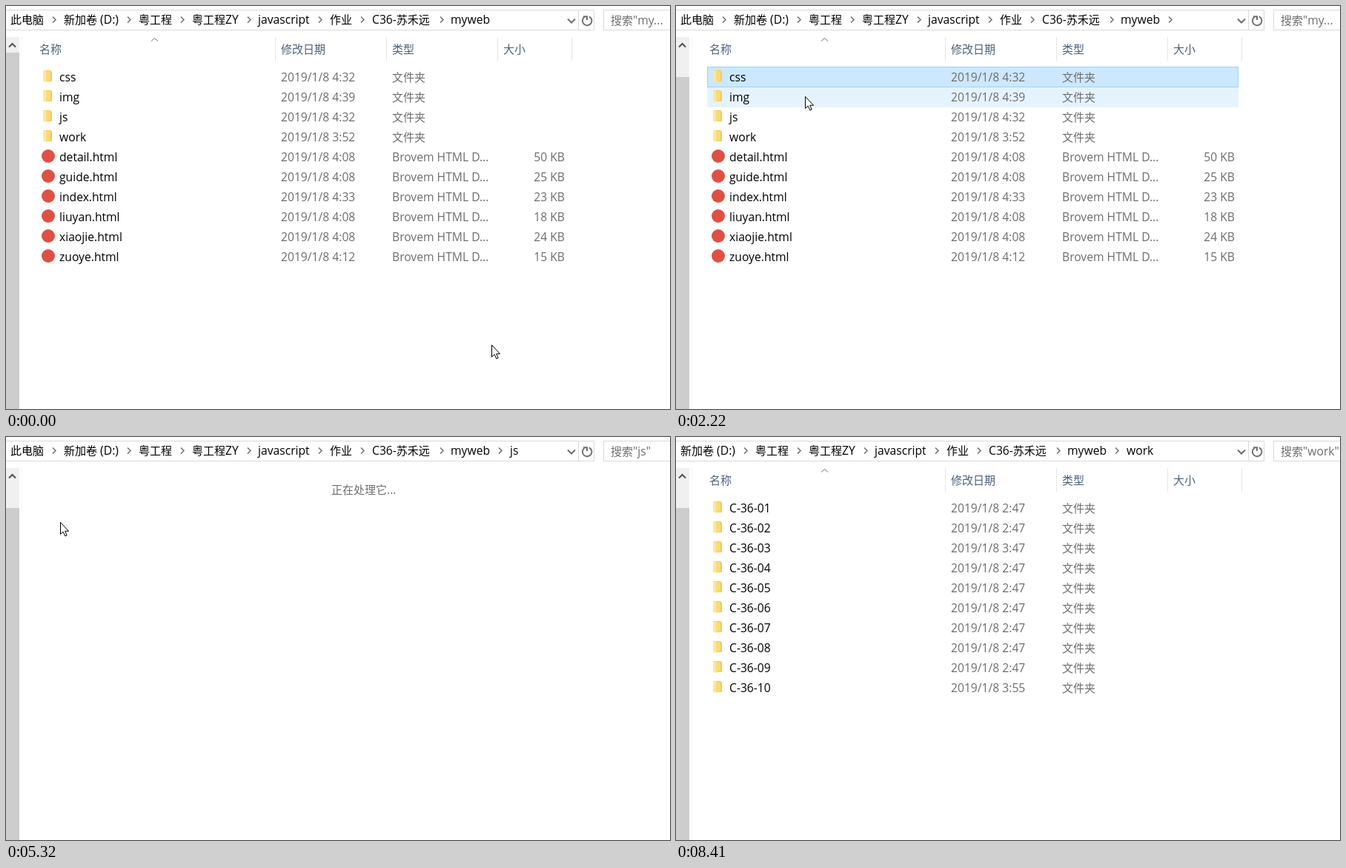
An HTML page that plays this animation: 896x545 px, repeating every 8490 ms.

```html
<!DOCTYPE html>
<html lang="zh-CN">
<head>
<meta charset="utf-8">
<title>myweb</title>
<style>
  html, body { margin: 0; width: 100%; height: 100%; overflow: hidden; background: #fff; }
  svg { display: block; width: 896px; height: 545px; }
  text { font: 15.66px "Open Sans", "Noto Sans CJK SC", "Noto Sans CJK", sans-serif; fill: #6d6d6d; }
  .han { font-family: "Noto Sans CJK SC", "Noto Sans CJK", sans-serif; font-size: 15px; }
  .dark { fill: #000; }
  .head { fill: #4c607a; }
  .tip { fill: #575757; }
  .line { fill: none; stroke: #d9d9d9; }
  .rule { fill: none; stroke: #e5e5e5; }
  .glyph { fill: none; stroke: #6e6e6e; stroke-width: 1.5; }
  .bold { stroke-width: 2; }
</style>
</head>
<body>
<svg viewBox="0 0 896 545">
  <defs>
    <g id="folder">
      <path d="M1 0H10L12 2V15H1Z" fill="#f4c95f"/>
      <path d="M0 1L4 0V13L6 14V16L0 15Z" fill="#ffe69c"/>
      <path d="M4 1H10V14H4Z" fill="#fad978"/>
    </g>
    <circle id="page" cx="7" cy="8" r="9" fill="#dd5144"/>
    <path id="file" d="M.5 .5H9L12.5 4V16.5H.5ZM9 .5V4H12.5" fill="#fff" stroke="#909090"/>
  </defs>
  <rect width="896" height="545" fill="#fff"/>
  <path class="line" d="M-1 5.5H793.5V32.5H-1M772.5 5.5V32.5M900 5.5H806.5V32.5H900"/>
  <path class="glyph bold" d="M758 17.5L763 22.5L768 17.5"/>
  <path class="glyph bold" d="M787 14.3A6.3 6.3 0 1 1 780.5 14.8M779 14.3H784V19"/>
  <path d="M0 42H18V545H0Z" fill="#f0f0f0"/>
  <path d="M21.5 42V545" stroke="#f8f8f8"/>
  <rect id="thumb" width="18" height="500" fill="#cdcdcd"/>
  <path d="M4 55.5L8.5 51L13 55.5" fill="none" stroke="#505050" stroke-width="2"/>
  <rect id="hover" x="42" width="717" height="27" fill="#e5f3ff"/>
  <g id="scene"></g>
  <path id="cursor" d="M.5 .5V16.5L4.2 13.2L6.8 19L9.2 18L6.7 12.3H11.5Z" fill="#fff" stroke="#000"/>
</svg>
<script>
const LOOP = 8490, ROW = 27, TOP = 82;
const $ = id => document.getElementById(id);

const text = (x, y, str, cls = "", extra = "") =>
  `<text x="${x}" y="${y}" class="${cls}" ${extra}>` +
  str.replace(/[\u3400-\u9fff]+/g, run => `<tspan class="han">${run}</tspan>`) + "</text>";
const chevron = x => `<path class="glyph" d="M${x} 14.5L${x + 4} 18.5L${x} 22.5"/>`;

const two = n => String(n).padStart(2, "0");
const folder = (name, time) => ({ icon: "folder", name, time, type: "文件夹" });
const page = (name, time, size) =>
  ({ icon: "page", name: name + ".html", time, type: "Brovem HTML D...", size: size + " KB" });
const file = (name, type, size, time = "3:30") => ({ icon: "file", name, time, type, size: size + " KB" });

const views = {
  myweb: [
    folder("css", "4:32"), folder("img", "4:39"), folder("js", "4:32"), folder("work", "3:52"),
    page("detail", "4:08", 50), page("guide", "4:08", 25), page("index", "4:33", 23),
    page("liuyan", "4:08", 18), page("xiaojie", "4:08", 24), page("zuoye", "4:12", 15)
  ],
  css: ["detail", "global", "guide", "index", "liuyan"].map((n, i) => file(n + ".css", "CSS 文件", 4 + i)),
  img: Array.from({ length: 17 }, (_, i) => file(two(i + 1) + ".jpg", "JPG 文件", 20 + i * 7 % 60)),
  js: [["global.js", 2], ["jquery.toast.js", 16], ["jquery-2.2.4.min.js", 84]]
    .map(([n, size]) => file(n, "JS 文件", size)),
  work: Array.from({ length: 10 }, (_, i) =>
    folder("C-36-" + two(i + 1), { 2: "3:47", 9: "3:55" }[i] || "2:47"))
};

const crumbs = [["此电脑", 6, 51], ["新加卷 (D:)", 78, 152], ["粤工程", 179, 224], ["粤工程ZY", 251, 314],
  ["javascript", 340, 410], ["作业", 437, 467], ["C36-苏禾远", 494, 574], ["myweb", 600, 653]];
const leafWidth = { css: 22, img: 28, js: 12, work: 37 };

const tips = {
  img: { x: 170, y: 156, w: 250, lines: ["创建日期: 2019/1/3 3:30", "大小: 1.02 MB", "文件: 01.jpg, 02.jpg, 03.jpg, ..."] },
  js: { x: 88, y: 163, w: 363, lines: ["创建日期: 2019/1/3 3:30", "大小: 102 KB",
    "文件: global.js, jquery.toast.js, jquery-2.2.4.min.js"] }
};

// Each entry changes some properties of the window from its time on.
const states = [
  [0, { view: "myweb", sel: -1, more: false, loading: false, tip: "", thumb: 63 }],
  [670, { sel: 0 }],
  [830, { view: "css", loading: true }],
  [980, { loading: false, thumb: 96 }],
  [1830, { view: "myweb" }],
  [1990, { more: true }],
  [2610, { tip: "img" }],
  [2760, { tip: "", sel: 1 }],
  [2930, { view: "img", loading: true, more: false }],
  [3090, { loading: false }],
  [4090, { view: "myweb" }],
  [4480, { more: true }],
  [4980, { sel: 2 }],
  [5240, { view: "js", loading: true, more: false }],
  [5400, { loading: false }],
  [6330, { view: "myweb" }],
  [6480, { more: true }],
  [6640, { tip: "js" }],
  [7100, { tip: "" }],
  [7250, { sel: 3 }],
  [7330, { view: "work", loading: true }],
  [7480, { loading: false }],
  [8410, { more: false }]
];

// Pointer stops: time, x, y
const path = [
  [0, 655, 458], [70, 655, 458], [350, 174, 104], [499, 174, 104], [500, 175, 104], [830, 175, 104],
  [1060, 24, 14], [1140, 24, -30], [1830, 24, -30], [1910, 24, 14], [2150, 174, 122], [2600, 174, 122],
  [2760, 172, 131], [3000, 172, 131], [3300, 2, 45], [3939, 2, 45], [3940, 47, 37], [4089, 47, 37],
  [4090, 47, -30], [4240, 47, -30], [4340, 42, 87], [4450, 42, 87], [4700, 95, 183], [4900, 88, 150],
  [5240, 88, 150], [5560, 29, 12], [5630, 29, -30], [6330, 29, -30], [6400, 42, 12], [6560, 88, 150],
  [6640, 91, 157], [7080, 91, 157], [7180, 95, 172], [7480, 95, 172], [7690, 880, 520],
  [7720, 880, 560], [LOOP, 880, 560]
];

function pointerAt(t) {
  const i = Math.max(1, path.findIndex(p => p[0] > t));
  const [t0, x0, y0] = path[i - 1], [t1, x1, y1] = path[i];
  const k = (t - t0) / (t1 - t0);
  return [Math.round(x0 + (x1 - x0) * k), Math.round(y0 + (y1 - y0) * k)];
}

function addressBar({ view, more }) {
  const trail = view === "myweb" ? crumbs : [...crumbs, [view, 680, 680 + leafWidth[view]]];
  const shift = view === "img" || view === "work" ? 72 : 0;
  const shown = shift ? trail.slice(1) : trail;
  const items = shown.map(([name, x, end], i) =>
    text(x - shift, 24, name, "dark") +
    (i < shown.length - 1 || more ? chevron(end - shift + 12) : "")).join("");
  return items + text(816, 25, view === "myweb" ? '搜索"my...' : `搜索"${view}"`);
}

function fileRow(item, i) {
  const y = 102 + i * ROW;
  return `<use href="#${item.icon}" x="50" y="${y - 15}"/>` + text(72, y, item.name, "dark") +
    text(371, y, "2019/1/8 " + item.time) + text(521, y, item.type) +
    (item.size ? text(754, y, item.size, "", 'text-anchor="end"') : "");
}

function listing({ view, sel }) {
  const heads = [["名称", 45], ["修改日期", 371], ["类型", 521], ["大小", 671]];
  const mark = view === "myweb" && sel >= 0
    ? `<rect x="42.5" y="${TOP + sel * ROW + .5}" width="716" height="27" fill="#cce8ff" stroke="#99d1ff"/>` : "";
  return heads.map(([name, x]) => text(x, 64, name, "head")).join("") +
    '<path class="rule" d="M363.5 42V74M513.5 42V74M663.5 42V74M763.5 42V74"/>' +
    '<path d="M196 47.5L200.5 43.5L205 47.5" fill="none" stroke="#6e6e6e"/>' +
    mark + views[view].map(fileRow).join("");
}

function tooltip({ x, y, w, lines }) {
  const box = (d, look) => `<rect x="${x + d}" y="${y + d}" width="${w - 1}" height="65" ${look}/>`;
  return box(4, 'opacity=".2"') + box(3, 'opacity=".4"') + box(.5, 'fill="#fff" stroke="#767676"') +
    lines.map((line, i) => text(x + 6, y + 18 + i * 20, line, "tip")).join("");
}

let drawn = -1;
function draw(now) {
  const t = now % LOOP;
  const past = states.filter(s => s[0] <= t);
  const state = Object.assign({}, ...past.map(s => s[1]));
  if (drawn !== past.length) {
    drawn = past.length;
    $("scene").innerHTML = addressBar(state) +
      (state.loading ? text(439, 77, "正在处理它...") : listing(state)) +
      (state.tip ? tooltip(tips[state.tip]) : "");
    $("thumb").setAttribute("y", state.thumb);
  }
  const [x, y] = pointerAt(t);
  $("cursor").setAttribute("transform", `translate(${x} ${y})`);
  const row = Math.floor((y - TOP) / ROW);
  const over = !state.loading && x >= 42 && x < 759 && row >= 0 && row < views[state.view].length;
  $("hover").setAttribute("y", over ? TOP + row * ROW + (row ? 1 : 0) : -50);
}

const start = performance.now();
function tick() {
  draw(performance.now() - start);
  requestAnimationFrame(tick);
}
tick();
</script>
</body>
</html>
```
